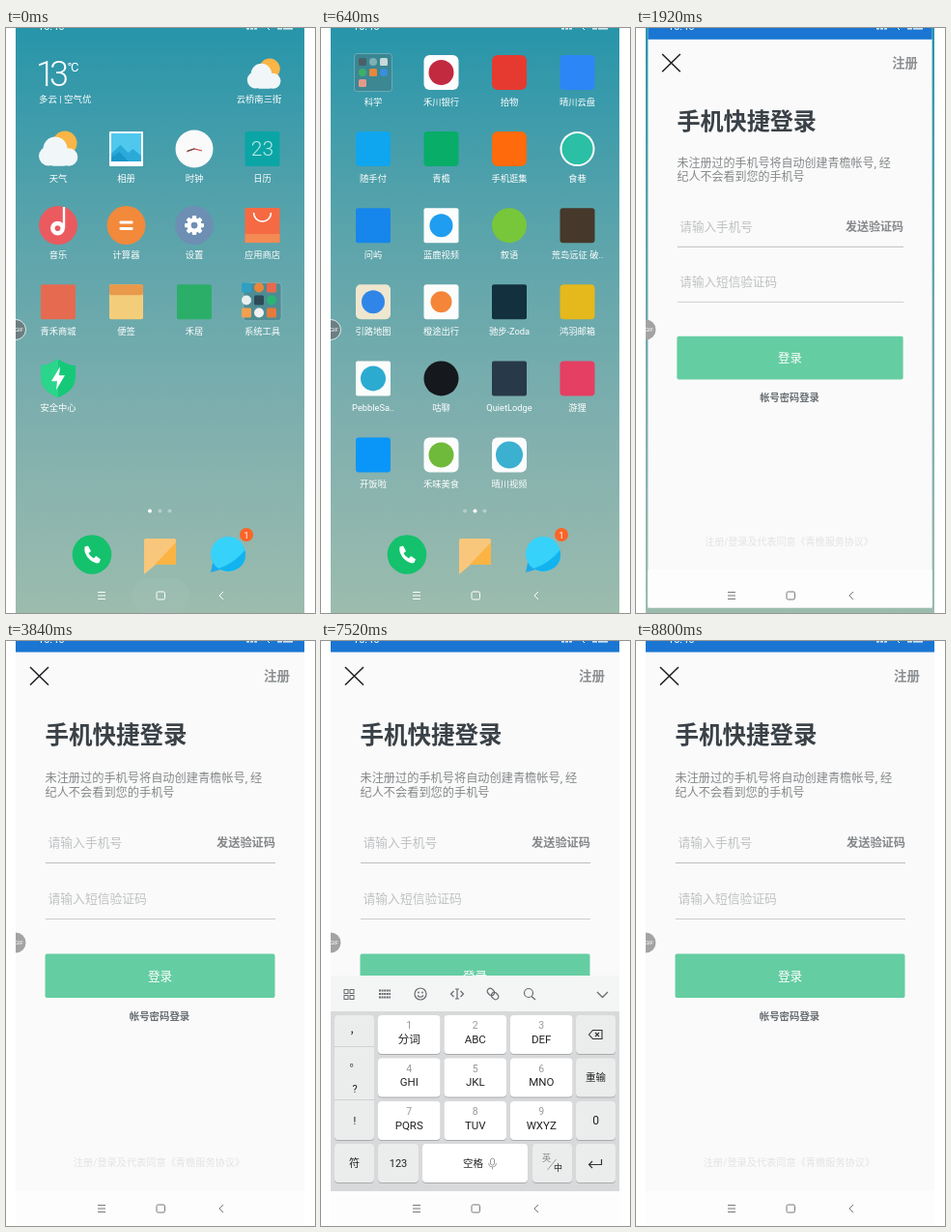
Animation of 320x605 px, one loop 9.76 s. Source, as an HTML page:

```html
<!DOCTYPE html>
<html lang="zh-CN">
<head>
<meta charset="utf-8">
<title>手机登录</title>
<style>
html, body { margin: 0; width: 100%; height: 100%; overflow: hidden; background: #fff; }
svg { display: block; width: 100%; height: 100%; }
text { font-family: Roboto, "Noto Sans CJK SC", "Noto Sans CJK", "Noto Sans", sans-serif; }
</style>
</head>
<body>
<svg id="stage" viewBox="0 0 320 605"></svg>
<script>
const LOOP = 9760, STEP = 160, PAGE = 299, KEYBOARD = 223;
const COLS = [54, 124.5, 195, 265.5];

const text = (x, y, size, fill, str, anchor = 'start', weight = 400) =>
  `<text x="${x}" y="${y}" font-size="${size}" fill="${fill}" text-anchor="${anchor}" font-weight="${weight}">${str}</text>`;
const rect = (x, y, w, h, fill, r = 0, more = '') =>
  `<rect x="${x}" y="${y}" width="${w}" height="${h}" rx="${r}" fill="${fill}" ${more}/>`;
const circle = (x, y, r, fill, more = '') => `<circle cx="${x}" cy="${y}" r="${r}" fill="${fill}" ${more}/>`;
const fillPath = (d, fill) => `<path d="${d}" fill="${fill}"/>`;
const line = (d, stroke, width = 1, more = '') =>
  `<path d="${d}" fill="none" stroke="${stroke}" stroke-width="${width}" ${more}/>`;
const group = (x, y, body) => `<g transform="translate(${x} ${y})">${body}</g>`;

// Launcher icons, each centred on 0,0
const tile = (fill, r = 4) => rect(-18, -18, 36, 36, fill, r);
const badgeTile = (fill, size = 12, r = 6) => tile('#fbfcfc', r) + circle(0, 0, size, fill);
const disc = (fill, r = 20) => circle(0, 0, r, fill);

const cloud = '#f1f7f8';
const cloudSun = circle(7, -6, 12.5, '#f9b545') + circle(-10, 7.5, 10, cloud) + circle(-3, 0, 12.5, cloud) +
  circle(11, 8.5, 9.3, cloud) + rect(-10, 6, 21, 11.7, cloud, 5);

const gear = Array.from({ length: 8 }, (_, i) =>
  rect(-2.2, -10, 4.4, 6, '#fff', 1, `transform="rotate(${i * 45})"`)).join('') +
  circle(0, 0, 7.7, '#fff') + circle(0, 0, 3.4, '#6d8fb3');

function folder(colors, pitch, size, shift = 0) {
  const minis = colors.map((c, i) => {
    const x = (i % 3 - 1) * pitch, y = (Math.floor(i / 3) - 1) * pitch;
    return rect(x - size / 2, y - size / 2, size, size, c, i % 2 ? size / 2 : 1.5);
  }).join('');
  return rect(-19.5, -19.5, 39, 39, '#3f7f88', 3, 'fill-opacity=".65" stroke="#a9cdd0" stroke-opacity=".45"') +
    group(shift, shift / 2, minis);
}

const gallery = rect(-17.5, -18, 35, 36, '#fff', 1) + rect(-15.5, -16, 31, 29, '#50c8ee') +
  fillPath('M-15.5 5 L-6 -4 L2 4 L7 0 L15.5 7 V13 H-15.5Z', '#2aaad8') +
  fillPath('M-15.5 9 L-7 3 L2 13 H-15.5Z', '#1897c8');
const clock = disc('#fafafa', 19.5) + line('M-8 3 L0 0 L8 2', '#c94b4b', 1.2) + line('M0 0 L-7 2', '#444', 1);
const calendar = tile('#0ba5a5', 2) + text(0, 7, 21, '#b5ebe6', '23', 'middle', 300);
const music = disc('#ea5a5f') + circle(-.5, 3, 5.2, 'none', 'stroke="#fff" stroke-width="4.5"') +
  line('M6 3 V-19', '#fff', 2.4);
const calculator = disc('#f2893b') + rect(-7, -4.5, 14, 3, '#fff', 1) + rect(-7, 2, 14, 3, '#fff', 1);
const store = tile('#f66a43', 1) + rect(-18, 9, 36, 9, '#f48b55') + line('M-9 -13 A9 9 0 0 0 9 -13', '#fff', 1.6);
const notes = rect(-17.5, -18, 35, 36, '#f4cd7b', 2) + rect(-17.5, -18, 35, 11, '#e9994b', 2);
const shield = fillPath('M0 -20 Q9 -14 18 -13 V0 Q17 13 0 20 Q-17 13 -18 0 V-13 Q-9 -14 0 -20Z', '#16c979') +
  fillPath('M0 -20 V20 Q-17 13 -18 0 V-13 Q-9 -14 0 -20Z', '#2bd58b') +
  fillPath('M2 -12 L-7 3 H-1 L-2 12 L7 -3 H1Z', '#fff');

const pageOne = [
  [cloudSun, '天气'], [gallery, '相册'], [clock, '时钟'], [calendar, '日历'],
  [music, '音乐'], [calculator, '计算器'], [disc('#6d8fb3') + gear, '设置'], [store, '应用商店'],
  [tile('#e56a50', 2), '青禾商城'], [notes, '便签'], [tile('#2baf68', 2), '禾居'],
  [folder(['#2f9fc4', '#e8873c', '#e9694e', '#e8efef', '#2d4a58', '#2bb574', '#f0a050', '#f2f2f2', '#e57a3c'], 13, 10, -3.5), '系统工具'],
  [shield, '安全中心'],
];
const pageTwo = [
  [folder(['#4a6066', '#7fb0b2', '#c9d8da', '#3fae6a', '#e8863a', '#3a8fe0', '#e49a8a'], 11, 8), '科学'],
  [badgeTile('#c22a40', 13), '禾川银行'], [tile('#e63a30', 6), '拾物'], [tile('#2c86f6'), '晴川云盘'],
  [tile('#10a5ef'), '随手付'], [tile('#08ad68'), '青檐'], [tile('#ff6a0c', 6), '手机逛集'], [badgeTile('#2bbfa6', 16, 18), '食巷'],
  [tile('#1686ec', 2), '问屿'], [badgeTile('#1f9df0', 12, 2), '蓝鹿视频'], [disc('#78c63a', 18), '叙语'], [tile('#46382a', 3), '荒岛远征 破..'],
  [tile('#efe6cf', 5) + circle(0, 0, 12, '#2f86e8'), '引路地图'], [badgeTile('#f58538', 11, 3), '橙途出行'],
  [tile('#12303e', 2), '驰步-Zoda'], [tile('#e5b81c'), '鸿羽邮箱'],
  [badgeTile('#2cabd0', 13, 2), 'PebbleSa..'], [disc('#15181c', 18), '咕聊'], [tile('#28394a', 2), 'QuietLodge'], [tile('#e53f63'), '游狸'],
  [tile('#0a96f8', 3), '开饭啦'], [badgeTile('#6fba3a', 13), '禾味美食'], [badgeTile('#3bb0d0', 14), '晴川视频'],
];
const grid = (items, top) => items.map(([icon, label], i) =>
  group(COLS[i % 4], top + Math.floor(i / 4) * 79.1, icon + text(0, 33.7, 9.3, '#fff', label, 'middle'))).join('');

const weather = text(31, 60, 36, '#fff', '1', 'start', 300) + text(45, 60, 36, '#fff', '3', 'start', 300) +
  text(64, 45, 13, '#fff', '℃') + text(34, 77, 9.5, '#fff', '多云 | 空气优') +
  group(267, 47.5, `<g transform="scale(.86)">${cloudSun}</g>`) + text(262, 77, 9.3, '#fff', '云桥南三街', 'middle');

const dock =
  group(89, 544.5, disc('#14c16c', 20.3) +
    fillPath('M-7.5 -8 L-4 -9 L-1 -3.5 L-3.5 -1.3 Q-1.5 2.5 2 4 L4.2 1.6 L9 5 L7.5 8.5 Q4 10 -2 5.5 Q-9 -1 -7.5 -8Z', '#fff')) +
  fillPath('M145 528 H174 Q176 528 176 530 V555 H155 L143 565 V530 Q143 528 145 528Z', '#f8c77b') +
  fillPath('M176 532 V555 H154Z', '#fbb443') +
  group(230, 544, fillPath('M-18 19 L-15 4 L-4 15Z', '#1ca9ea') + disc('#36d2fa', 18) +
    fillPath('M17.5 -4 Q20 9 10 15 Q0 21 -10 15 Q6 10 17.5 -4Z', '#12b3ee')) +
  circle(249, 524, 7, '#fb6427') + text(249, 527.5, 9.5, '#fff', '1', 'middle');

const login =
  rect(10, -5, PAGE, 612, '#fafafa') + rect(10, 569, PAGE, 40, '#fdfdfd') + rect(10, -5, PAGE, 16.5, '#1a76d2') +
  line('M25 27 L44 45.5 M44 27 L25 45.5', '#202326', 1.6) +
  text(294, 41, 13.5, '#8c8f91', '注册', 'end', 700) +
  text(40.5, 106, 24.5, '#3a4147', '手机快捷登录', 'start', 700) +
  text(40.5, 146, 12.2, '#85888a', '未注册过的手机号将自动创建青檐帐号, 经') +
  text(40.5, 160.5, 12.2, '#85888a', '纪人不会看到您的手机号') +
  text(43.5, 212.7, 12.8, '#bfc1c2', '请输入手机号') +
  text(279, 212.5, 12.2, '#85888b', '发送验证码', 'end', 700) +
  text(43.5, 271.2, 12.8, '#bfc1c2', '请输入短信验证码') +
  rect(41, 229, 238, 1, '#bdbdbd') + rect(41, 287, 238, 1, '#cdcdcd') +
  rect(40.5, 323.5, 238, 45.5, '#65cda2', 2) +
  text(159.5, 351, 12.6, '#fff', '登录', 'middle') +
  text(159, 392, 10.4, '#6a6f73', '帐号密码登录', 'middle', 700) +
  text(158.5, 543, 10.2, '#e3e3e3', '注册/登录及代表同意《青檐服务协议》', 'middle') +
  rect(43.2, 0, 1.5, 18, '#555', 0, 'id="cursor"');

const key = (x, y, w, fill, body = '', h = 40) =>
  rect(x, y + 1, w, h, '#a9acaf', 4) + rect(x, y, w, h, fill, 4) + group(x + w / 2, y + h / 2, body);
const word = (str, size = 11) => text(0, size * .37, size, '#222', str, 'middle');

function keyboard() {
  const grey = '#ebecec', ink = '#676b6e';
  const outline = `stroke="${ink}" stroke-width="1.2"`;
  const letters = ['分词', 'ABC', 'DEF', 'GHI', 'JKL', 'MNO', 'PQRS', 'TUV', 'WXYZ'];
  const pad = letters.map((s, i) => key(59 + i % 3 * 68.5, 387 + Math.floor(i / 3) * 44.5, 64.5, '#fff',
    text(0, -6, 10.5, '#999', i + 1, 'middle') + text(0, 8.5, 11.5, '#222', s, 'middle'))).join('');
  const squares = [0, 1, 2, 3].map(i => rect(24 + i % 2 * 6, 360.5 + (i >> 1) * 6, 4, 4, 'none', 0, `stroke="${ink}"`)).join('');
  const rows = [361.5, 365, 368.5].map(y => line(`M60 ${y} H72`, ink, 2, 'stroke-dasharray="2 .6"')).join('');
  const links = [-7, -1].map(x => rect(x, -3, 8, 6, 'none', 3, outline)).join('');
  const tools = squares + rows + circle(103, 365, 6, 'none', outline) +
    circle(101, 363.5, .9, ink) + circle(105, 363.5, .9, ink) +
    line('M100 366.5 Q103 370 106 366.5 M141 360 V370 M139 360 H143 M139 370 H143 M137.5 362 L134.5 365 L137.5 368 M144.5 362 L147.5 365 L144.5 368', ink, 1.2) +
    group(178, 365, `<g transform="rotate(45)">${links}</g>`) +
    circle(215, 364, 4.5, 'none', outline) + line('M218 367.5 L222 371 M286 363 L291.5 368.5 L297 363', ink, 1.3);
  const marks = [['，', 406], ['。', 440], ['?', 467], ['!', 500]].map(([s, y]) => text(35, y, 11, '#222', s, 'middle')).join('');
  const erase = line('M-7 0 L-3 -4.5 H6.5 V4.5 H-3Z M-.5 -2 L3.5 2 M3.5 -2 L-.5 2', '#333', 1.1);
  const enter = line('M6 -4 V1.5 H-7 M-3.5 -2 L-7 1.5 L-3.5 5', '#333', 1.2);
  const space = text(-2, 4, 10.5, '#222', '空格', 'middle') +
    rect(16, -5, 4, 7, 'none', 2, 'stroke="#999"') + line('M14 0 Q14 4 18 4 Q22 4 22 0 M18 4 V6.5', '#999', .9);
  const lang = text(-6, -2, 9, '#888', '英', 'middle') + line('M-5 7 L4 -4', '#888', .8) + text(6, 8, 9, '#222', '中', 'middle');
  return rect(10, 346, PAGE, 37, '#f4f5f5') + rect(10, 383, PAGE, 186, '#d8d9da') + tools +
    key(14, 387, 41, grey, '', 129) + line('M14 419.5 H55 M14 474.5 H55', '#cfd1d2') + marks + pad +
    key(264, 387, 41, grey, erase) + key(264, 431.5, 41, grey, word('重输', 10.5)) + key(264, 476, 41, grey, word('0', 12)) +
    key(14, 520, 41, grey, word('符')) + key(59, 520, 42, grey, word('123')) + key(105, 520, 109, '#fff', space) +
    key(219, 520, 41, grey, lang) + key(264, 520, 41, grey, enter);
}

const status = text(33, 1.6, 11, '#fff', '10:46') +
  [[249, 3], [253, 3], [257, 3], [281, 5], [287, 10]].map(([x, w]) => rect(x, 0, w, 1.6, '#fff', 0, 'opacity=".8"')).join('') +
  line('M270 -1 L273 2', '#fff');

const stage = document.getElementById('stage');
stage.innerHTML = `
  <defs>
    <linearGradient id="sky" x2="0" y2="1">
      <stop offset="0" stop-color="#2795aa"/><stop offset=".35" stop-color="#5ba4ab"/>
      <stop offset=".7" stop-color="#82b0ae"/><stop offset="1" stop-color="#9cbcae"/>
    </linearGradient>
    <clipPath id="screen">${rect(10, 0, PAGE, 605, '#000')}</clipPath>
    <clipPath id="aboveNav">${rect(10, 0, PAGE, 569, '#000')}</clipPath>
  </defs>
  <g clip-path="url(#screen)">
    ${rect(10, 0, PAGE, 605, 'url(#sky)')}
    <g id="pages">${weather}${grid(pageOne, 125)}${group(PAGE, 0, grid(pageTwo, 46))}</g>
    ${[149, 159.5, 169.5].map(x => circle(x, 499.5, 2, '#fff', 'class="dot"')).join('')}
    ${dock}
    ${rect(130, 569, 60, 36, '#fff', 18, 'id="ripple"')}
    <g id="app">${login}</g>
    <g clip-path="url(#aboveNav)"><g id="keys">${keyboard()}</g></g>
    ${status}
    <g id="nav" fill="none">
      <path d="M95 583.5 H103 M95 587 H103 M95 590.5 H103 M225 583 L221 587 L225 591"/>
      <rect x="156" y="583" width="8.5" height="8" rx="1.5"/>
    </g>
    <circle id="bubble" cx="10" cy="312" r="10.5"/>
    ${text(9, 314.3, 6, '#fff', 'GIF')}
  </g>`;

const el = id => document.getElementById(id);
const dots = [...document.querySelectorAll('.dot')];
const set = (node, attrs) => { for (const k in attrs) node.setAttribute(k, attrs[k]); };
const held = (keys, t) => keys.filter(k => k[0] <= t).pop()[1];

const SWIPE = [[0, 0], [480, .7], [640, 1]];
const RIPPLE = [[0, .03], [160, .02], [320, 0]];
const KEYS_DROP = [[0, KEYBOARD], [6400, 90], [6560, 0], [7840, 70], [8000, 160], [8160, KEYBOARD]];
const CURSOR_Y = [[0, null], [6240, 257], [6720, null], [7040, 199], [7520, null]];

function draw(time) {
  const t = Math.floor(time % LOOP / STEP) * STEP;
  const swipe = held(SWIPE, t), open = t >= 1920, drop = held(KEYS_DROP, t), cursorY = held(CURSOR_Y, t);
  const scale = t < 2080 ? .984 : 1;
  set(el('pages'), { transform: `translate(${-swipe * PAGE} 0)` });
  dots.forEach((dot, i) => set(dot, { opacity: i === Math.round(swipe) ? 1 : .35 }));
  set(el('ripple'), { opacity: held(RIPPLE, t) });
  set(el('app'), {
    display: open ? 'inline' : 'none',
    transform: `translate(160 30) scale(${scale}) translate(-160 -30)`,
  });
  set(el('cursor'), { display: cursorY === null ? 'none' : 'inline', y: cursorY || 0 });
  set(el('keys'), { display: drop < KEYBOARD ? 'inline' : 'none', transform: `translate(0 ${drop})` });
  set(el('nav'), { stroke: open ? '#77797b' : '#fff' });
  set(el('bubble'), open ? { fill: '#a3a3a3', stroke: 'none' } : { fill: '#6b7f82', stroke: '#dfe9ea' });
}

const start = performance.now();
function tick() {
  draw(performance.now() - start);
  requestAnimationFrame(tick);
}
tick();
</script>
</body>
</html>
```
